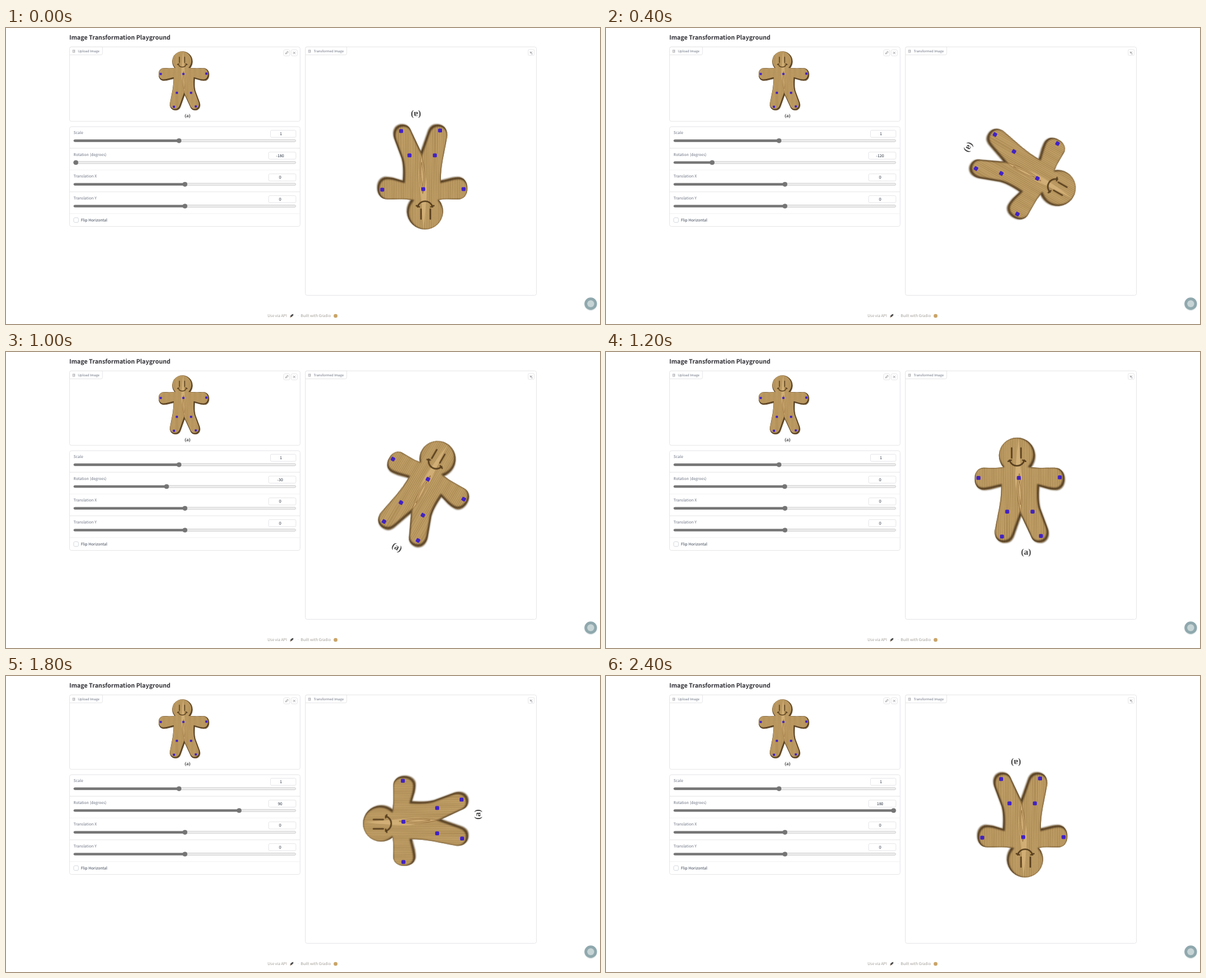
Recreate the animation shown at these times as an HTML page. Size 1023x511 px, loop 2600 ms.

```html
<!DOCTYPE html>
<html lang="en">
<head>
<meta charset="utf-8">
<title>Image Transformation Playground</title>
<style>
  html, body { margin: 0; width: 100%; height: 100%; overflow: hidden; background: #fff; }
  svg { display: block; width: 1023px; height: 511px; }
  text { font: 6.64px "Noto Sans CJK JP", "Noto Sans CJK SC", "Noto Sans CJK", "Noto Sans", sans-serif;
         fill: #6b7280; text-rendering: geometricPrecision; }
  text.title { font-size: 10.34px; font-weight: 600; fill: #303036; }
  text.tab { font-size: 5.69px; }
  text.num { fill: #1f2937; text-anchor: middle; }
  text.dark { fill: #374151; }
  text.foot { fill: #a29d97; }
  text.caption { font: bold 15px "Liberation Serif", "Noto Serif", serif; fill: #444; text-anchor: middle; }
  .box { fill: #fff; stroke: #e4e4e7; stroke-width: .9; }
  .icon { fill: none; stroke: #71717a; stroke-width: .7; }
</style>
</head>
<body>
<svg viewBox="0 0 1023 511">
  <defs>
    <path id="outline" d="M16.7 -49 C30 -47 45 -48 58 -48 C69 -48 75 -39 75 -29 C75 -17 68 -9 58 -10
      C48 -10 40 -14 31 -16 C30 0 30 10 33 22 L46 57 C50 70 44 81 32 81 C23 81 19 76 16 68
      L0 34 L-12 68 C-15 77 -20 81 -28 81 C-40 81 -47 72 -45 59 L-37 18 C-35 5 -34 -6 -34 -16
      C-44 -14 -54 -10 -64 -10 C-74 -10 -80 -18 -80 -29 C-80 -40 -74 -48 -64 -48
      C-53 -48 -42 -47 -30.7 -49 A31 31 0 1 1 16.7 -49 Z"/>
    <clipPath id="cut"><use href="#outline"/></clipPath>
    <filter id="soft" x="-10%" y="-10%" width="120%" height="120%"><feGaussianBlur stdDeviation="1.1"/></filter>
    <filter id="photo" x="-10%" y="-10%" width="120%" height="120%"><feGaussianBlur stdDeviation=".45"/></filter>
    <g id="figure">
      <use href="#outline" fill="#5a4428" opacity=".8" filter="url(#soft)" transform="translate(.9 1.1)"/>
      <g filter="url(#photo)"><g clip-path="url(#cut)">
        <rect x="-85" y="-105" width="170" height="190" fill="#b8965f"/>
        <path id="grain" fill="none" stroke="#83632f" stroke-width=".9" opacity=".42"/>
        <path id="shine" fill="none" stroke="#d9b97f" stroke-width=".9" opacity=".6"/>
        <path d="M-4 -100 C-9 -60 -11 -30 -9 -15 C-7 0 -2 12 -1 34 C2 12 5 -2 3 -16 C1 -35 -2 -65 -4 -100Z"
              fill="#d8b67d" opacity=".75"/>
        <path d="M-3 -38 C-10 -14 -6 4 -1 30 C3 4 4 -14 -3 -38Z M-3 -26 C-6 -10 -4 0 -1 16 C1 0 1 -10 -3 -26Z"
              fill="none" stroke="#8a6433" stroke-width=".8"/>
        <use href="#outline" fill="none" stroke="#3e2a14" stroke-width="4" opacity=".8"
             filter="url(#soft)" transform="translate(-1.3 -1.6)"/>
      </g></g>
      <g fill="none" stroke="#59401f" stroke-width="2.6" stroke-linecap="round" filter="url(#photo)">
        <path d="M0 -82V-65M-16 -82V-65"/>
        <path d="M-20 -61 C-15 -48 1 -48 6 -61 M-22 -59 L-17 -61 M3 -61 L8 -59"/>
      </g>
      <g id="dots" fill="#4122c4"></g>
      <text class="caption" x="8.8" y="102.7">(a)</text>
    </g>
  </defs>

  <text class="title" x="109" y="20">Image Transformation Playground</text>

  <rect class="box" x="109.5" y="32.7" width="397" height="128.5" rx="3"/>
  <rect class="box" x="109.5" y="170.5" width="397" height="172" rx="3"/>
  <rect class="box" x="515.5" y="32.7" width="398" height="428.8" rx="3"/>
  <g id="tabs"></g>

  <rect class="box" x="478.3" y="37.7" width="10.4" height="10.4" rx="2"/>
  <path class="icon" d="M481.6 44.8 L482 43 L485 40.2 L486.2 41.4 L483.2 44.4 Z"/>
  <rect class="box" x="491.2" y="37.7" width="10.4" height="10.4" rx="2"/>
  <path class="icon" d="M494.5 41 l3.9 3.9 m0 -3.9 l-3.9 3.9"/>
  <rect class="box" x="899.3" y="37" width="10.4" height="10.4" rx="2"/>
  <path class="icon" d="M903 40.4 v2.6 h2.4 M903.2 42.8 l3.2 -1.6 M904.6 44.8 h2.4"/>

  <g id="rows"></g>
  <rect class="box" x="116.7" y="327.6" width="8" height="8" rx="1.8" style="stroke:#d1d5db"/>
  <text class="dark" x="129" y="333.6">Flip Horizontal</text>

  <use href="#figure" transform="translate(307.6 96.3) scale(.561)"/>
  <use id="turned" href="#figure"/>

  <text class="foot" x="450.3" y="499.1">Use via API</text>
  <path d="M489.2 499.6 L490 496.6 L492.6 494.2 L495 493.8 L494.5 496.2 L492 498.8 Z" fill="#4b4a4c"/>
  <circle cx="490.2" cy="498.9" r=".9" fill="#b9a48c"/>
  <text class="foot" x="501.3" y="499.1">·</text>
  <text class="foot" x="507.6" y="499.1">Built with Gradio</text>
  <circle cx="567.6" cy="497" r="3.3" fill="#c9a468"/>

  <circle cx="1007" cy="476.6" r="11.4" fill="#8fa8ad" opacity=".25"/>
  <circle cx="1007" cy="476" r="10.7" fill="#8fa8ad"/>
  <circle cx="1007" cy="476" r="6" fill="#c6d4d6"/>
</svg>
<script>
const el = id => document.getElementById(id);
const STEP = 200, COUNT = 13;
const LEFT = 116.5, RIGHT = 499;

// Wood grain: gently wavering vertical lines
const grainLines = start => {
  let d = '';
  for (let x = start; x < 80; x += 3) {
    const w = 2.5 * Math.sin(x * 1.7), v = 1.5 * Math.cos(x * 2.3);
    d += `M${x} -104c${w} 60 ${-w} 130 ${v} 192`;
  }
  return d;
};
el('grain').setAttribute('d', grainLines(-84));
el('shine').setAttribute('d', grainLines(-82.5));

const handles = [[-3.8, -30.3], [66.8, -31.3], [-73.3, -30.3], [19.8, 27.8], [-23.8, 27.8], [34.3, 69.8], [-32.8, 70.8]];
el('dots').innerHTML = handles.map(([x, y]) =>
  `<rect x="${x - 3.4}" y="${y - 3.4}" width="6.8" height="6.8" rx="1.6"/>`).join('');

const tab = (x, width, label) => `
  <path class="box" d="M${x} 46.3 V35.7 q0 -3 3 -3 H${x + width} V43.8 q0 2.5 -2.5 2.5 Z"/>
  <path class="icon" d="M${x + 5} 38.3 h4.6 M${x + 5} 40 h1.4 m1.2 0 h2 M${x + 5} 41.7 h4.6"/>
  <text class="tab" x="${x + 14.5}" y="41.9">${label}</text>`;
el('tabs').innerHTML = tab(109.5, 56.7, 'Upload Image') + tab(515.5, 71.3, 'Transformed Image');

const row = ([label, value, knob, boxX], i) => {
  const y = 194.6 + i * 37.63;
  return `
    <text x="116.3" y="${y - 11.4}">${label}</text>
    <rect class="box" x="${boxX}" y="${y - 18.1}" width="${499.3 - boxX}" height="12.3" rx="2.2"/>
    <text class="num" x="${i ? 472 : 473.5}" y="${y - 9.6}">${value}</text>
    <rect x="${LEFT}" y="${y - 1.9}" width="${RIGHT - LEFT}" height="3.8" rx="1.9" fill="#efefef" stroke="#b5b5b5" stroke-width=".6"/>
    <rect class="fill" x="${LEFT}" y="${y - 2.1}" width="${knob - LEFT}" height="4.2" rx="2.1" fill="#757575"/>
    <circle class="knob" cx="${knob}" cy="${y}" r="4.1" fill="#757575"/>
    <path d="M110 ${y + 12.9} H506" stroke="#e4e4e7" stroke-width="${i % 2 ? .5 : .9}"/>`;
};
el('rows').innerHTML = [
  ['Scale', 1, 298, 455.5],
  ['Rotation (degrees)', -180, 120.3, 452.3],
  ['Translation X', 0, 308.2, 452.3],
  ['Translation Y', 0, 308.2, 452.3]
].map((r, i) => `<g>${row(r, i)}</g>`).join('');

const rotation = el('rows').children[1];
const [number, bar, knob] = ['.num', '.fill', '.knob'].map(s => rotation.querySelector(s));

function draw(now) {
  const angle = -180 + 30 * (Math.floor(now / STEP) % COUNT);
  const x = 120.3 + (angle + 180) / 360 * 375;
  number.textContent = angle;
  bar.setAttribute('width', x - LEFT);
  knob.setAttribute('cx', x);
  el('turned').setAttribute('transform', `translate(714.75 247.75) rotate(${-angle})`);
}
function tick() {
  draw(performance.now());
  requestAnimationFrame(tick);
}
tick();
</script>
</body>
</html>
```
